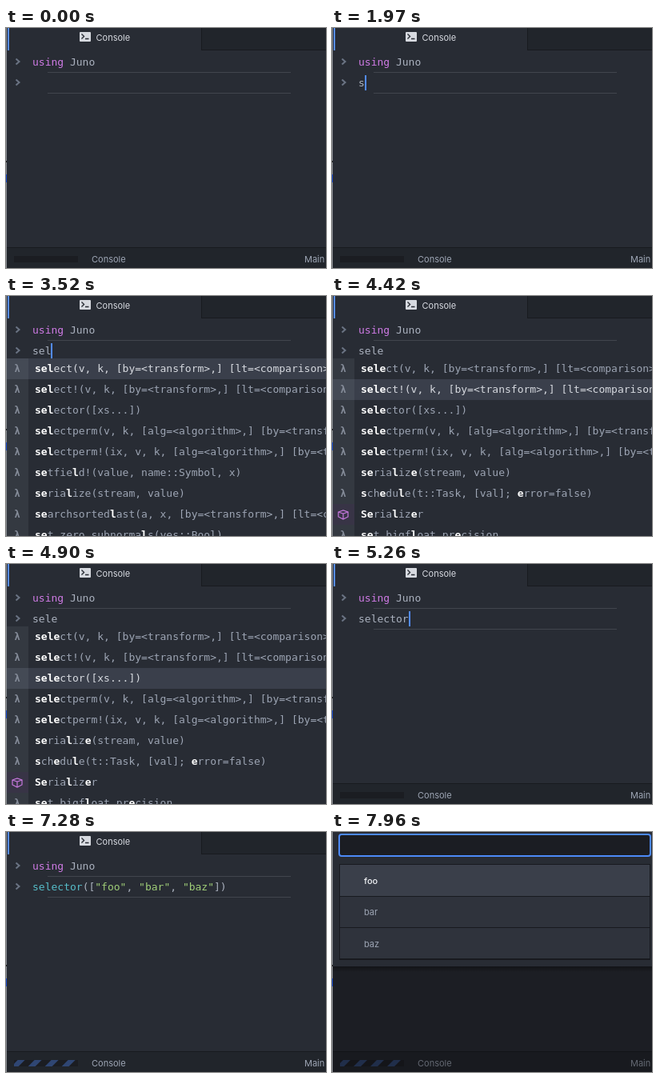
Write an HTML page that moves like this. It is 400 by 300 pixels and loops after 8000 ms.

```html
<!DOCTYPE html>
<html lang="en">
<head>
<meta charset="utf-8">
<title>Console completion</title>
<style>
  html, body { margin: 0; width: 100%; height: 100%; overflow: hidden; background: #282c34; }
  svg { display: block; }
  text { white-space: pre; font: 11px Inter, sans-serif; }
  .code { font: 13px "DejaVu Sans Mono", monospace; }
  .code .hit { font-weight: bold; fill: #fff; }
</style>
</head>
<body>
<svg id="stage" width="400" height="300" viewBox="0 0 400 300"></svg>
<script>
const LOOP = 8000, CHAR = 7.827, ROW = 26, LIST_TOP = 78;
const MODAL_AT = 7340, RUN_AT = 7220;
const stage = document.getElementById('stage');

const SEARCH = ['seek(s, pos)', 'select(v, k, [by=<transform>,] [lt=<comparison>,])',
  'search(string, chars, [start])', 'seekend(s)', 'select!(v, k, [by=<transform>,] [lt=<comparison>,])',
  'selector([xs...])', 'setdiff(s1, s2)', 'seekstart(s)', 'setenv(command, env)'];
const SELECT = ['select(v, k, [by=<transform>,] [lt=<comparison>,])',
  'select!(v, k, [by=<transform>,] [lt=<comparison>,])', 'selector([xs...])',
  'selectperm(v, k, [alg=<algorithm>,] [by=<transform>,])',
  'selectperm!(ix, v, k, [alg=<algorithm>,] [by=<transform>,])'];
const SEL = [...SELECT, 'setfield!(value, name::Symbol, x)', 'serialize(stream, value)',
  'searchsortedlast(a, x, [by=<transform>,] [lt=<comparison>,])', 'set_zero_subnormals(yes::Bool)'];
// "~" keeps the next letter out of the match
const SELE = [...SELECT, 'serialize(stream, value)', 'schedul~e(t::Task, [val]; error=false)',
  'Serializer', 'set_bigfloat_precision'];

// Each step changes part of the state from its time on.
const steps = [
  [0, { typed: '', cursor: 0 }], [50, { cursor: 1 }], [470, { cursor: 0 }], [830, { cursor: 1 }],
  [1250, { cursor: 0 }], [1670, { cursor: 1 }],
  [1970, { typed: 's' }], [2270, { list: SEARCH, query: 's', pick: 0 }],
  [2330, { typed: 'se' }], [2450, { query: 'se' }],
  [2800, { cursor: 0 }], [3220, { cursor: 1 }],
  [3400, { typed: 'sel' }], [3520, { list: SEL, query: 'sel' }],
  [3640, { typed: 'sele' }], [3700, { list: SELE, query: 'sele' }],
  [4120, { cursor: 0 }], [4420, { pick: 1 }], [4480, { cursor: 1 }], [4600, { pick: 2 }],
  [4900, { cursor: 0 }], [5260, { typed: 'selector', list: null, cursor: 1 }],
  [5740, { cursor: 0 }], [6090, { call: true, cursor: 1 }],
  [6570, { cursor: 0 }], [6990, { cursor: 1 }], [RUN_AT, { cursor: 0 }]
];

const escape = s => s.replace(/&/g, '&amp;').replace(/</g, '&lt;');
const rect = (x, y, w, h, fill, more = '') =>
  `<rect x="${x}" y="${y}" width="${w}" height="${h}" fill="${fill}" ${more}/>`;
const text = (x, y, fill, body, more = '') => `<text x="${x}" y="${y}" fill="${fill}" ${more}>${body}</text>`;
const code = (x, y, fill, body) => text(x, y, fill, body, 'class="code"');
const span = (fill, s) => `<tspan fill="${fill}">${s}</tspan>`;
const line = (d, stroke, width) => `<path d="${d}" fill="none" stroke="${stroke}" stroke-width="${width}"/>`;

function highlight(label, query) {
  let i = 0, skip = false, out = '';
  for (const c of label) {
    if (c === '~') { skip = true; continue; }
    const hit = !skip && i < query.length && c.toLowerCase() === query[i];
    if (hit) i++;
    out += hit ? `<tspan class="hit">${c}</tspan>` : escape(c);
    skip = false;
  }
  return out;
}

function progress(t) {
  let out = rect(10, 285, 80, 8, '#1b1d22');
  if (t < RUN_AT) return out;
  const shift = (t - 7960) * 0.03 % 21;
  for (let x = -19 + shift; x < 100; x += 21)
    out += `<path d="M${x + 4} 293l8 -8h9l-8 8z" fill="#2f4673" clip-path="url(#bar)"/>`;
  return out;
}

function editor(s, t) {
  let out = rect(0, 0, 400, 300, '#282c34')
    + rect(244, 0, 156, 28, '#21252b') + rect(244, 0, 1, 28, '#181a1f') + rect(244, 27, 156, 1, '#181a1f')
    + rect(2, 0, 2, 28, '#568cf5')
    + rect(92, 5, 14, 12, '#d7dae0', 'rx="1"')
    + line('M94.5 7.5l3 3l-3 3M99 13.5h4.5', '#282c34', 1.4)
    + text(112.5, 16, '#d7dae0', 'Console')
    + rect(52, 55, 304, 1, '#41454d') + rect(52, 81, 304, 1, '#41454d');
  for (const y of [42, 68]) out += line(`M12.5 ${y - 3.5}l4 3.5l-4 3.5`, '#6b7484', 2);
  out += code(33, 47, '#abb2bf', span('#d07be6', 'using') + ' Juno');
  const strings = ['foo', 'bar', 'baz'].map(w => span('#a0cf78', `"${w}"`)).join(', ');
  out += code(33, 73, '#abb2bf', s.call ? span('#56bdc9', 'selector') + `([${strings}])` : s.typed);
  if (s.cursor) out += rect(Math.round(33 + s.typed.length * CHAR), 59, 2, 19, '#528bff');
  return out + rect(1, 274, 399, 26, '#21252b') + rect(1, 274, 399, 1, '#181a1f') + progress(t)
    + text(107, 293, '#9da5b4', 'Console') + text(373, 293, '#9da5b4', 'Main');
}

function completions({ list, query, pick }) {
  let out = rect(1, LIST_TOP, 399, 222, '#282c34');
  list.forEach((label, i) => {
    const y = LIST_TOP + i * ROW, active = i === pick, module = label === 'Serializer';
    if (active) out += rect(1, y, 399, ROW, '#3a3f4b');
    out += rect(1, y, 27, ROW, module ? '#c678dd' : '#9da5b4', 'opacity=".1"');
    out += module
      ? line(`M8 ${y + 10}l6 -2l6 2v6l-6 3l-6 -3zl6 2l6 -2M14 ${y + 12}v7`, '#c678dd', 1.2)
      : text(14, y + 17, '#858c99', 'λ', 'class="code" text-anchor="middle" style="font-size:12px;font-weight:bold"');
    out += code(36, y + 17, active ? '#d7dae0' : '#9da5b4', highlight(label, query));
  });
  return out;
}

function modal(t) {
  const left = 1 - Math.min(1, (t - MODAL_AT) / 240);
  let out = `<g opacity="${1 - left ** 3}">` + rect(1, 0, 399, 300, '#0b0c0e', 'opacity=".4"')
    + rect(1, 160, 399, 15, 'url(#shadow)') + rect(1, 0, 399, 168, '#282c34')
    + rect(9, 3, 389, 27, '#1b1d23', 'rx="3" stroke="#4d8af8" stroke-width="2"')
    + rect(9, 40, 389, 120, '#181a1f');
  ['foo', 'bar', 'baz'].forEach((word, i) => {
    const y = 41 + i * 39.5;
    out += rect(10, Math.round(y), 387, i ? 38 : 39, i ? '#2f333c' : '#3a3f4a')
      + text(40, Math.round(y + 23.5), i ? '#9da5b4' : '#f0f2f5', word, i ? '' : 'font-weight="500" style="font-weight:500"');
  });
  return out + '</g>';
}

const defs = `<defs><clipPath id="bar">${rect(10, 285, 80, 8, '#000')}</clipPath>
  <linearGradient id="shadow" x2="0" y2="1"><stop offset=".5" stop-opacity=".4"/>
  <stop offset="1" stop-opacity="0"/></linearGradient></defs>`;
const desktop = rect(0, 0, 1, 300, '#8b8e93') + rect(0, 166, 1, 2, '#222') + rect(0, 183, 1, 10, '#1d4fd0');

function draw(now) {
  const t = now % LOOP, state = {};
  for (const [at, change] of steps) if (t >= at) Object.assign(state, change);
  stage.innerHTML = defs + editor(state, t) + (state.list ? completions(state) : '')
    + (t >= MODAL_AT ? modal(t) : '') + desktop;
}

const start = performance.now();
function tick() {
  draw(performance.now() - start);
  requestAnimationFrame(tick);
}
tick();
</script>
</body>
</html>
```
